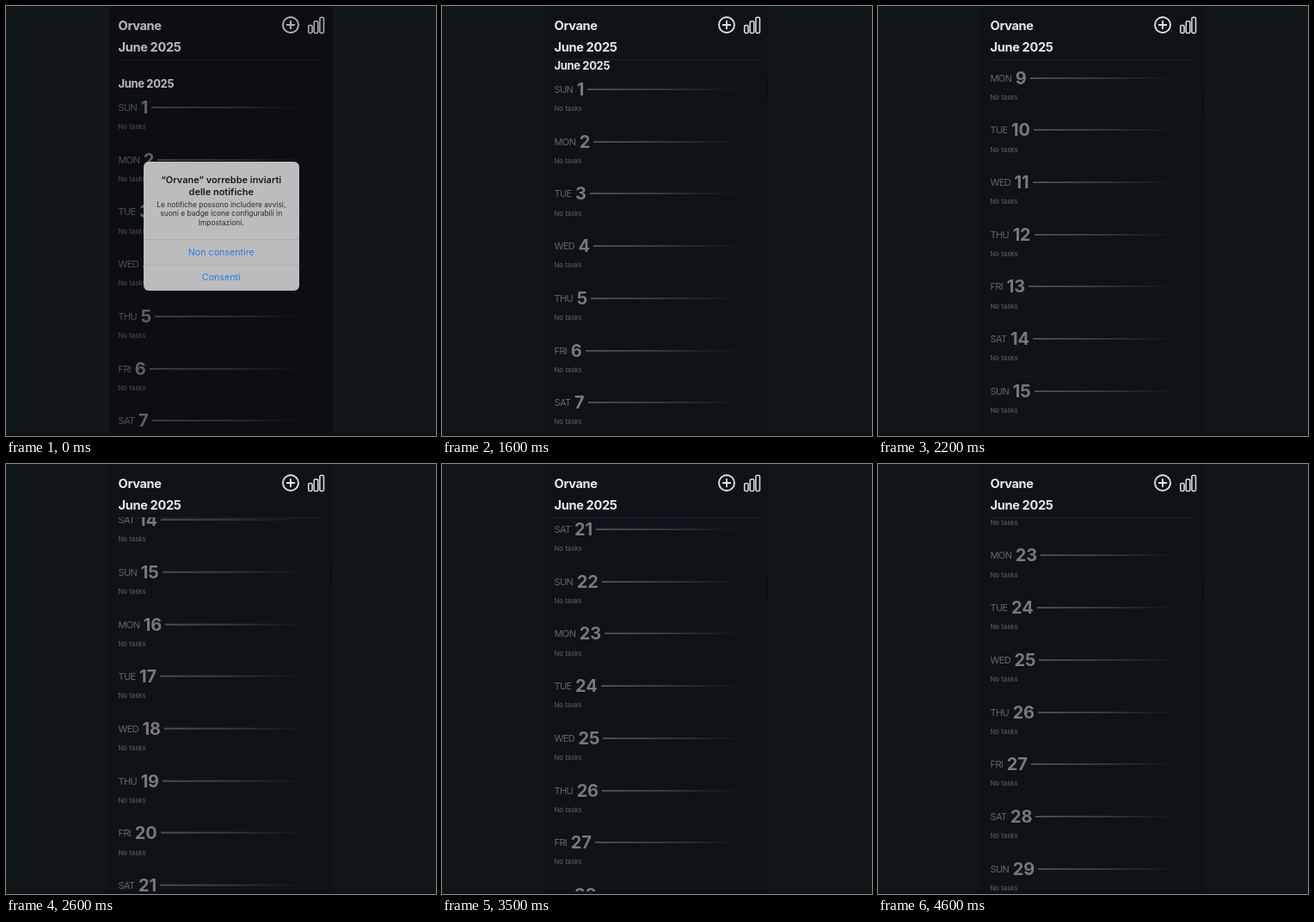
An HTML page for the animation above (5000 ms loop, 500 by 500 pixels).

```html
<!DOCTYPE html>
<html lang="it">
<head>
<meta charset="utf-8">
<title>Calendar scroll</title>
<style>
  html, body { margin: 0; width: 100%; height: 100%; overflow: hidden; background: #111618; }
  #stage { position: relative; width: 500px; height: 500px; overflow: hidden; background: #111618;
    font-family: Inter, Roboto, sans-serif; white-space: nowrap; }
  #stage div { position: absolute; }
  #panel { left: 120px; top: 0; width: 260px; height: 497px; background: #0f1217; overflow: hidden; }
  #foot { left: 0; top: 497px; width: 500px; height: 3px; background: #0d1113; }
  .label { height: 20px; line-height: 20px; left: 10.5px; letter-spacing: -.35px; color: #e8e9ea; font-weight: 700; }
  .head { font-size: 14.6px; }
  #rule { left: 10px; top: 62px; width: 240px; height: 1px; background: #1d2024; }
  #clip { left: 0; top: 62px; width: 260px; height: 435px; overflow: hidden; }
  #list { left: 0; top: -62px; width: 260px; }
  #stage .day { left: 10.5px; width: 239.5px; height: 24px; display: flex; align-items: center; line-height: 24px; }
  .name { font-size: 11px; letter-spacing: -.6px; color: #626569; }
  .num { font-size: 20px; font-weight: 700; letter-spacing: -.2px; color: #79797c; margin: 0 4.2px 0 4.5px; }
  .line { flex: 1; height: 2px; background: linear-gradient(90deg, #4b4d4f, #37393b 40%, #1a1d21 72%, transparent 90%); }
  .note { left: 10.5px; height: 12px; line-height: 12px; font-size: 7.8px; color: #626569; }
  #bar { left: 256.5px; width: 2px; height: 23px; background: #0a0c10; }
  #dim { inset: 0; background: #000; }
  #alert { left: 160px; top: 181px; width: 180.5px; height: 149.5px; border-radius: 6px; background: #bcbcbf; color: #18191b; }
  #alert div { left: 0; width: 100%; height: 14px; line-height: 14px; text-align: center; }
  #alert .title { font-size: 11px; font-weight: 600; }
  #alert .body { font-size: 8.45px; color: #2b2c2e; }
  #alert .btn { font-size: 10.7px; color: #2a7ddb; }
  #alert .sep { height: 1px; background: #adadb1; }
  svg { position: absolute; left: 0; top: 0; fill: none; stroke: #dfe0e1; }
</style>
</head>
<body>
<div id="stage">
  <div id="panel">
    <div id="rule"></div>
    <div id="clip"><div id="list"></div></div>
    <div class="label head" style="top:12.5px">Orvane</div>
    <div class="label head" style="top:37.5px">June 2025</div>
    <svg width="260" height="60">
      <g stroke-width="1.9" stroke-linecap="round">
        <circle cx="211" cy="22" r="9"/>
        <path d="M206.7 22h8.6M211 17.7v8.6"/>
      </g>
      <g stroke-width="1.5">
        <rect x="231.7" y="22.5" width="4.4" height="9" rx="1.4"/>
        <rect x="238.2" y="17.7" width="4.6" height="13.8" rx="1.4"/>
        <rect x="244.9" y="13.2" width="4.6" height="18.3" rx="1.4"/>
      </g>
    </svg>
    <div id="bar"></div>
    <div id="dim"></div>
  </div>
  <div id="foot"></div>
  <div id="alert"></div>
</div>
<script>
  const LOOP = 5000, STEP = 100, PITCH = 60.7, FIRST = 118;
  const WEEK = ['SUN', 'MON', 'TUE', 'WED', 'THU', 'FRI', 'SAT'];
  // time, scroll offset, speed in px per ms
  const SCROLL = [
    [1500, 0, 0], [1600, 21, .5], [2200, 520, .85],
    [3000, 1086.6, .46], [3500, 1256, .24], [4100, 1347, 0]
  ];
  const $ = id => document.getElementById(id);

  function add(parent, cls, y, height, html) {
    const el = document.createElement('div');
    el.className = cls;
    el.style.top = y - height / 2 + 'px';
    el.innerHTML = html;
    parent.append(el);
    return el;
  }

  const list = $('list'), box = $('alert');
  add(list, 'label', 89.5, 20, 'June 2025').style.fontSize = '13px';
  for (let d = 1; d <= 30; d++) {
    const y = FIRST + (d - 1) * PITCH;
    add(list, 'day', y, 24, `<span class="name">${WEEK[(d - 1) % 7]}</span>` +
      `<span class="num">${d}</span><span class="line"></span>`);
    add(list, 'note', y + 22.2, 12, 'No tasks');
  }

  [
    ['title', 20.5, '“Orvane” vorrebbe inviarti'],
    ['title', 35, 'delle notifiche'],
    ['body', 49.5, 'Le notifiche possono includere avvisi,'],
    ['body', 60.2, 'suoni e badge icone configurabili in'],
    ['body', 71, 'Impostazioni.'],
    ['btn', 105.5, 'Non consentire'],
    ['btn', 135, 'Consenti']
  ].forEach(([cls, y, text]) => add(box, cls, y, 14, text));
  [90.5, 120].forEach(y => add(box, 'sep', y, 1, ''));

  // Cubic Hermite curve through the scroll points
  function scrollAt(t) {
    if (t <= SCROLL[0][0]) return 0;
    const i = SCROLL.findIndex(p => p[0] >= t);
    if (i < 0) return SCROLL[SCROLL.length - 1][1];
    const [t0, y0, v0] = SCROLL[i - 1], [t1, y1, v1] = SCROLL[i];
    const h = t1 - t0, u = (t - t0) / h, w = 1 - u;
    return y0 * (1 + 2 * u) * w * w + v0 * h * u * w * w +
      y1 * u * u * (3 - 2 * u) - v1 * h * u * u * w;
  }

  function alertAt(t) {
    return t < 800 ? 1 : t < 900 ? .45 : t < 1000 ? .13 : 0;
  }

  function draw(now) {
    const t = Math.floor((now % LOOP) / STEP) * STEP;
    const y = scrollAt(t), shown = alertAt(t);
    list.style.transform = `translateY(${-y}px)`;
    box.style.opacity = shown;
    $('dim').style.opacity = shown * .2;
    $('bar').style.top = 83 + y * .039 + 'px';
    $('bar').style.opacity = t < 1600 ? 0 : 1;
  }

  const start = performance.now();
  function frame() {
    draw(performance.now() - start);
    requestAnimationFrame(frame);
  }
  frame();
</script>
</body>
</html>
```
